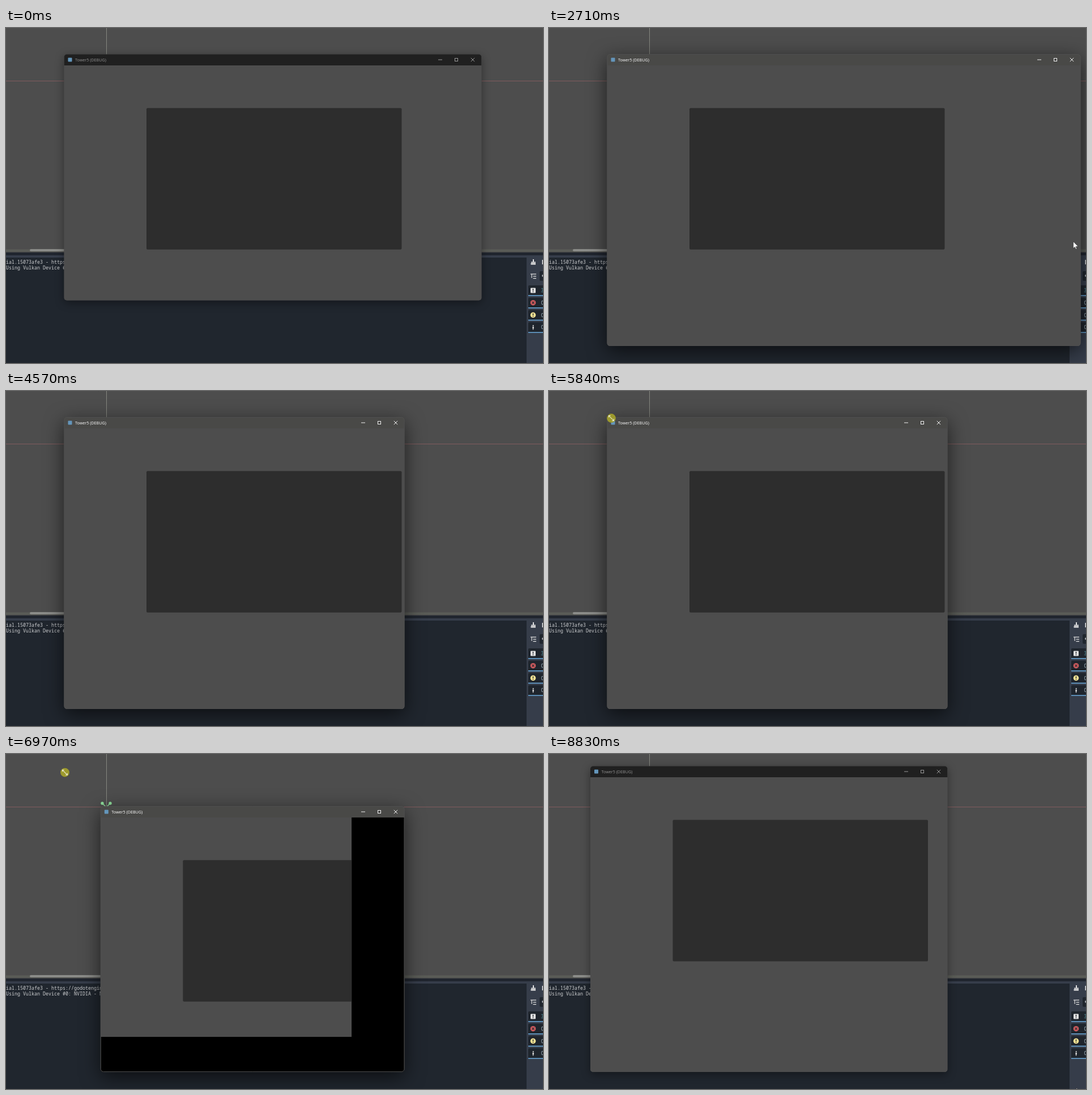
An HTML page with a canvas for the animation above (8.9 s loop, 948 by 591 pixels).

```html
<!DOCTYPE html>
<html lang="en">
<head>
<meta charset="utf-8">
<title>Window resize</title>
<style>
html, body { margin: 0; width: 100%; height: 100%; overflow: hidden; background: #4d4d4d; }
canvas { display: block; width: 948px; height: 591px; }
</style>
</head>
<body>
<canvas id="stage" width="948" height="591"></canvas>
<script>
const ctx = document.getElementById('stage').getContext('2d');
const LOOP = 8900, STEP = 1000 / 15;
const GREY = '#4d4d4d', PANE = '#20262e', SIDE = '#363d4a', INK = '#e0e0e0';
const MONO = '8.33px "Noto Sans Mono", "DejaVu Sans Mono", monospace';

// Start of each drag; motion ticks at 15 fps from there
const GROW = 1310, NARROW = 3850, LEAVE = 4440, CORNER = 6040, RETURN = 6970;
const GROWN = GROW + 400, NARROWED = NARROW + 400, TURN = 6640, SETTLED = 7420, BLUR = 8830;

function quantise(t) {
  const start = Math.max(...[0, GROW, NARROW, LEAVE, CORNER, RETURN].filter(s => s <= t));
  return start + Math.floor((t - start + 12) / STEP) * STEP;
}

const smooth = u => u * u * (3 - 2 * u);
const late = u => u ** 3.9;

// Eased travel from a to b, optionally bent towards a control point
function glide(t, start, end, a, b, bend, ease = smooth) {
  const s = ease(Math.min(1, Math.max(0, (t - start) / (end - start))));
  return a.map((p, i) => {
    const c = bend ? bend[i] : (p + b[i]) / 2;
    return (1 - s) ** 2 * p + 2 * s * (1 - s) * c + s * s * b[i];
  });
}

const HOME = [102.5, 46], INNER = [260, 154];

function topLeft(t) {
  return t < 6773
    ? glide(t, CORNER, 6773, HOME, INNER, [147, 115.5])
    : glide(t, 6773, 7170, INNER, [73, 21], [165, 95]);
}

function bottomRight(t) {
  return t < NARROW
    ? glide(t, GROW, GROWN, [839.5, 480.5], [938.5, 561])
    : glide(t, NARROW, NARROWED, [938.5, 561], [703.5, 561], null, late);
}

// How far the app has redrawn while its frame lags behind
const drawnRight = t => glide(t, NARROW, 4234, [938.5], [703.5])[0];
const drawnOrigin = t => glide(t, CORNER, TURN, HOME, INNER, [162, 121]);

// Pointer stages: start time, shape, position
const POINTER = [
  [70, 'arrow', t => glide(t, 70, 440, [921, 586], [836, 479])],
  [440, 'diag', t => glide(t, GROW, 1680, [838.5, 483], [937, 564.3])],
  [1970, 'arrow', t => glide(t, 1970, 2840, [932, 552], [932, 366], [875, 455])],
  [2880, 'horiz', t => glide(t, NARROW, 4150, [938, 371.5], [707, 372])],
  [LEAVE, 'arrow', t => t < 4573
    ? glide(t, LEAVE, 4573, [696, 366], [157, -13])
    : glide(t, 4573, 5300, [157, -13], [111, 40], [40, 0])],
  [5360, 'diag', t => t < TURN
    ? glide(t, CORNER, 6580, [110, 48], [268, 156], [221, 136])
    : glide(t, TURN, 7060, [268, 156], [82, 16])],
  [7570, 'arrow', t => glide(t, 7570, 7760, [78, 18], [70, -18])],
  [7770, 'none'],
  [8360, 'arrow', () => [912, 587]],
  [8550, 'none'],
  [BLUR, 'arrow', () => [931, 589]]
];

// Spans with the button held
const PRESSES = [[910, GROWN], [3510, NARROWED], [5640, SETTLED]];

function rect(x, y, w, h, color) {
  ctx.fillStyle = color;
  ctx.fillRect(x, y, w, h);
}

function round(x, y, w, h, r, color) {
  ctx.beginPath();
  ctx.roundRect(x, y, w, h, r);
  ctx.fillStyle = color;
  ctx.fill();
}

function disc(x, y, r, color) {
  ctx.beginPath();
  ctx.arc(x, y, r, 0, Math.PI * 2);
  ctx.fillStyle = color;
  ctx.fill();
}

function line(points, color, width = 1) {
  ctx.beginPath();
  points.forEach(([x, y]) => ctx.lineTo(x, y));
  ctx.strokeStyle = color;
  ctx.lineWidth = width;
  ctx.stroke();
}

function text(s, x, y, font, color) {
  ctx.font = font;
  ctx.fillStyle = color;
  ctx.fillText(s, x, y);
}

function cross(x, y, r, color, width = 1) {
  line([[x - r, y - r], [x + r, y + r]], color, width);
  line([[x + r, y - r], [x - r, y + r]], color, width);
}

function drawEditor() {
  rect(0, 0, 948, 591, GREY);
  rect(0, 93, 948, 1, '#815b5d');
  rect(178, 93, 491, 1, '#77636b');
  rect(177, 0, 1, 390, '#868880');
  rect(669, 94, 1, 296, '#5a5a5c');
  const green = '#8fe09c';
  cross(177, 94, 7, green, 1.6);
  for (const dx of [-7, 7]) for (const dy of [-7, 7]) disc(177 + dx, 94 + dy, 2.7, green);
  disc(177, 94, 1.5, '#d6c0c4');

  rect(0, 390.5, 948, 4, '#5a5c57');
  round(42, 390, 500, 4, 2, '#8b8c89');
  rect(0, 396, 948, 5.5, '#20252e');
  rect(0, 401, 948, 190, SIDE);
  rect(0, 405, 919, 186, PANE);
  text('ial.15073afe3 - https://godotengine.org', 0, 416, MONO, '#cdcfd1');
  text('Using Vulkan Device #0: NVIDIA - NVIDIA GeForce', 0, 426, MONO, '#cdcfd1');
  drawSidebar();
}

function drawSidebar() {
  // Broom and the clipped button beside it
  rect(930, 408, 2, 5, INK);
  rect(927, 412.5, 8, 2, INK);
  rect(926.5, 415, 8.5, 2.5, INK);
  rect(946.5, 409, 1.5, 8, INK);

  // Collapse toggle and search field
  rect(926, 433.5, 10, 1.3, INK);
  rect(930.5, 437.3, 5.5, 1.3, INK);
  rect(930.5, 441, 5.5, 1.3, INK);
  rect(927.5, 435, 1.2, 6, INK);
  round(942, 429, 10, 17, 2, PANE);
  disc(948, 437, 2, '#a5a9af');

  [drawMessage, drawError, drawWarning, drawInfo].forEach((icon, i) => {
    const y = 463 + i * 21.7;
    round(922, y - 9, 30, 18, 2, '#1f252d');
    rect(922, y + 8.3, 26, 1.4, '#70b4e8');
    text(i ? '0' : '3', 944.5, y + 3.2, '8.5px "Noto Sans", sans-serif', i ? '#a9bac4' : '#62aeb8');
    icon(930.5, y);
  });
}

function bang(x, y) {
  rect(x - 0.7, y - 3, 1.4, 3.5, '#23282f');
  rect(x - 0.7, y + 1.6, 1.4, 1.4, '#23282f');
}

function drawMessage(x, y) {
  round(x - 4.5, y - 4.5, 9, 9, 1, INK);
  bang(x, y);
}

function drawError(x, y) {
  disc(x, y, 4.8, '#cf5b5e');
  cross(x, y, 2, '#2a2a30', 1.2);
}

function drawWarning(x, y) {
  disc(x, y, 4.8, '#f0df92');
  bang(x, y);
}

function drawInfo(x, y) {
  rect(x - 0.7, y - 4, 1.8, 1.8, INK);
  rect(x - 1, y - 1.4, 2.3, 3.6, INK);
  rect(x - 0.6, y + 2.2, 1.3, 2, INK);
}

function drawTitle(l, t, r, active, growing) {
  const ink = growing ? '#bdbdbd' : active ? '#f2f2f2' : '#999';
  const y = Math.round(t + 10);
  rect(l, t, r - l, 20, active ? '#494947' : '#202020');
  round(l + 7, y - 3.5, 7, 7, 1, '#6496bb');
  text('Tower5 (DEBUG)', l + 19.5, y + 2.8, '7.2px "Open Sans", "Noto Sans", sans-serif', active ? '#fff' : '#929292');
  rect(Math.round(r - 76.5), y - 0.5, 7, 1, ink);
  ctx.strokeStyle = growing ? '#78b6dc' : ink;
  ctx.lineWidth = 1;
  ctx.strokeRect(Math.round(r - 47.5) + 0.5, y - 2.5, 5, 5);
  cross(r - 15.5, y, 3.2, ink);
}

// Size of the last redraw, plus the backdrop showing past it
function staleContent(l, top, r, b, t) {
  const full = [r - l, b - top];
  if (t >= GROW && t < GROWN - 5) {
    rect(l, top, ...full, '#000');
    return [839.5 - l, 480 - top];
  }
  if (t >= NARROW && t < NARROWED - 5) {
    const x = drawnRight(t);
    rect(x, top, Math.max(0, Math.min(839, r) - x), 480 - top, '#232424');
    return [x - l, full[1]];
  }
  if (t >= CORNER && t < SETTLED) {
    const [x, y] = drawnOrigin(t);
    const h = b - y - 20;
    if (t < TURN) rect(l, top, full[0], h + 7, '#242424');
    else rect(l, top, ...full, '#000');
    return [r - x, h];
  }
  return full;
}

function drawContent(l, t, r, b, time) {
  const top = t + 20;
  rect(l, top, r - l, b - top, GREY);
  const [w, h] = staleContent(l, top, r, b, time);
  ctx.beginPath();
  ctx.rect(l, top, w, h);
  ctx.clip();
  rect(l, top, w, h, GREY);
  round(l + 145.5, t + 95.2, 450.5, 249.5, 2, '#2d2d2d');
}

function drawWindow(time) {
  const active = time >= GROW && time < BLUR;
  const [l, t] = topLeft(time);
  const [r, b] = bottomRight(time);
  const inset = active ? 0 : 0.6;
  const frame = [l, t + inset, r - l, b - t - inset];

  ctx.save();
  ctx.shadowColor = active ? 'rgba(0,0,0,.62)' : 'rgba(0,0,0,.4)';
  ctx.shadowBlur = active ? 34 : 16;
  ctx.shadowOffsetY = active ? 9 : 4;
  round(...frame, 5, GREY);
  ctx.restore();

  ctx.save();
  ctx.beginPath();
  ctx.roundRect(...frame, 5);
  ctx.clip();
  drawTitle(l, t, r, active, time >= GROW && time < GROWN - 5);
  drawContent(l, t, r, b, time);
  ctx.restore();

  if (!active) return;
  ctx.beginPath();
  ctx.roundRect(l + 0.5, t + 0.5, r - l - 1, b - t - 1, 5);
  ctx.strokeStyle = '#4f4f4f';
  ctx.lineWidth = 1;
  ctx.stroke();
}

function drawArrow(x, y) {
  ctx.save();
  ctx.translate(x, y);
  ctx.beginPath();
  ctx.moveTo(0, 0);
  ctx.lineTo(0, 12);
  ctx.lineTo(2.8, 9.5);
  ctx.lineTo(4.6, 13.5);
  ctx.lineTo(6.3, 12.7);
  ctx.lineTo(4.6, 8.9);
  ctx.lineTo(8.4, 8.6);
  ctx.closePath();
  ctx.fillStyle = '#fff';
  ctx.fill();
  ctx.strokeStyle = '#222';
  ctx.lineWidth = 0.6;
  ctx.stroke();
  ctx.restore();
}

function drawResize(x, y, angle) {
  const ink = '#f4f4e6';
  ctx.save();
  ctx.translate(x, y);
  ctx.rotate(angle);
  line([[-6, 0], [6, 0]], ink);
  for (const s of [-1, 1]) line([[s * 4, -2.2], [s * 6.3, 0], [s * 4, 2.2]], ink);
  ctx.restore();
}

// Highlight opacity, fading at both ends of a press
function pressLevel(t) {
  const fades = PRESSES.map(([down, up]) => Math.min(1, (t - down + STEP) / 200, (up + 130 - t) / 130));
  return Math.max(0, ...fades);
}

function drawPointer(time, t) {
  const stage = POINTER.filter(([start]) => start <= t).pop();
  if (!stage || stage[1] === 'none') return;
  const [, shape, place] = stage;
  const [x, y] = place(time);
  if (shape === 'arrow') {
    drawArrow(x, y);
    return;
  }
  ctx.globalAlpha = pressLevel(time) * 0.96;
  disc(x, y, 7.9, '#a09d2c');
  ctx.globalAlpha = 1;
  drawResize(x, y, shape === 'diag' ? Math.PI / 4 : 0);
}

function frame(now) {
  const t = now % LOOP;
  const time = quantise(t);
  drawEditor();
  drawWindow(time);
  drawPointer(time, t);
  requestAnimationFrame(frame);
}
requestAnimationFrame(frame);
</script>
</body>
</html>
```
